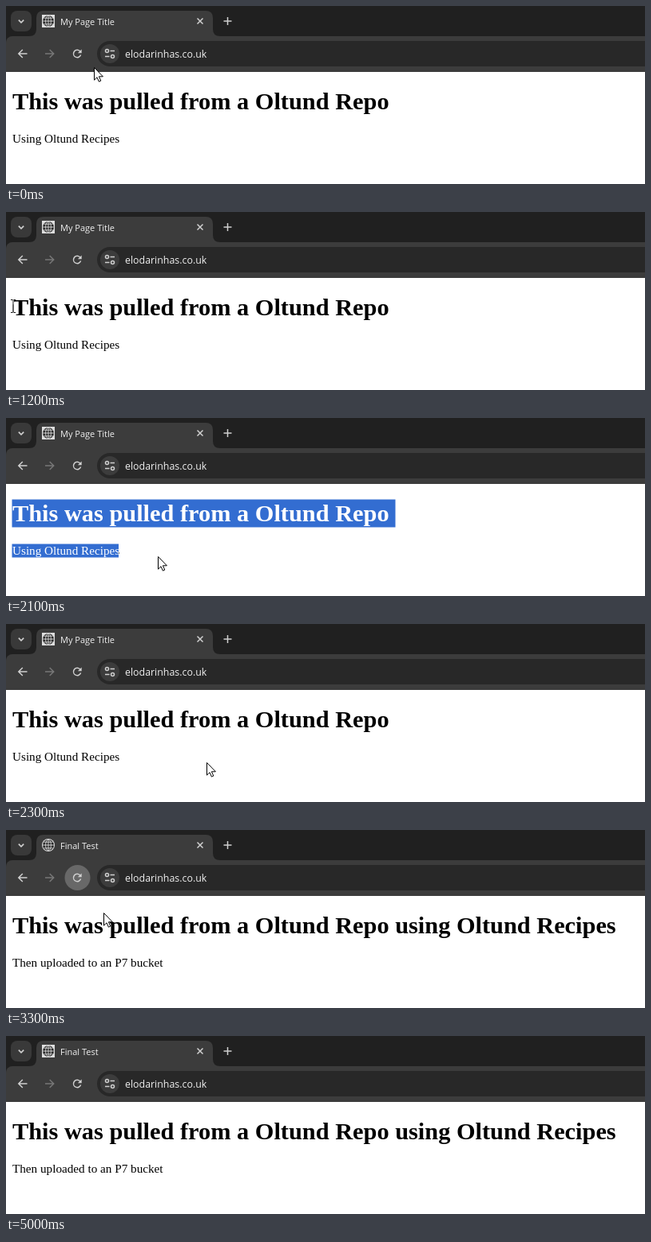
An HTML page with a canvas for the animation above (5200 ms loop, 800x224 px).

```html
<!DOCTYPE html>
<html lang="en">
<head>
<meta charset="utf-8">
<title>Browser reload</title>
<style>
  html, body { margin: 0; width: 100%; height: 100%; overflow: hidden; background: #fff; }
  canvas { display: block; }
</style>
</head>
<body>
<canvas id="stage" width="800" height="224"></canvas>
<script>
const ctx = document.getElementById('stage').getContext('2d');
const LOOP = 5200, STEP = 100;
const UI = '"Open Sans", "Noto Sans", sans-serif';
const SERIF = '"Liberation Serif", "Noto Serif", serif';
const BLUE = '#336dd1', BAR = '#3c3c3c', ICON = '#d0d0d0';

const oldPage = {
  tab: 'My Page Title',
  head: 'This was pulled from a Oltund Repo',
  para: 'Using Oltund Recipes'
};
const newPage = {
  tab: 'Final Test',
  head: 'This was pulled from a Oltund Repo using Oltund Recipes',
  para: 'Then uploaded to an P7 bucket'
};

// Pointer path: time, x, y
const path = [
  [0, 110, 77], [300, 86, 96], [600, 37, 119], [700, 33, 122],
  [900, 20, 126], [1200, 9, 118], [1300, 121, 160], [1500, 142, 165],
  [1800, 166, 167], [2100, 190, 174], [2400, 281, 174], [2500, 250, 150],
  [2700, 170, 113], [2900, 90, 62], [3000, 83, 52], [3200, 86, 60],
  [3300, 122, 104], [3600, 150, 124], [3800, 330, 142], [4000, 615, 150]
];
const beamTimes = [[400, 1400], [2600, 2700], [3400, 3600]];
const within = (t, a, b) => t >= a && t <= b;

function pointerAt(t) {
  const i = path.findIndex(p => p[0] >= t);
  if (i < 0) return null;
  const b = path[i], a = path[Math.max(0, i - 1)];
  const k = b === a ? 0 : (t - a[0]) / (b[0] - a[0]);
  return [Math.round(a[1] + (b[1] - a[1]) * k), Math.round(a[2] + (b[2] - a[2]) * k)];
}

function box(x, y, w, h, fill, r = 0) {
  ctx.fillStyle = fill;
  ctx.beginPath();
  ctx.roundRect(x, y, w, h, r);
  ctx.fill();
}

function disc(x, y, r, fill) {
  ctx.fillStyle = fill;
  ctx.beginPath();
  ctx.arc(x, y, r, 0, Math.PI * 2);
  ctx.fill();
}

function stroke(d, color, width) {
  ctx.strokeStyle = color;
  ctx.lineWidth = width;
  ctx.stroke(new Path2D(d));
}

function text(s, x, y, font, fill) {
  ctx.font = font;
  ctx.fillStyle = fill;
  ctx.fillText(s, x, y);
}

function globe(square) {
  if (square) box(45, 11, 16, 16, '#dedede');
  else disc(53, 19, 8, '#dedede');
  disc(53, 19, 7, '#2a2a2a');
  ctx.strokeStyle = '#d8d8d8';
  ctx.lineWidth = 0.9;
  ctx.beginPath();
  ctx.ellipse(53, 19, 3.4, 7, 0, 0, Math.PI * 2);
  ctx.stroke();
  stroke('M53 12V26M46 19H60M47.5 15.2H58.5M47.5 22.8H58.5', '#d8d8d8', 0.9);
}

function reload(t) {
  if (within(t, 2900, 3000)) disc(89.5, 60, 16, '#535353');
  else if (within(t, 3100, 3400)) disc(89.5, 60, 16, '#686868');
  ctx.strokeStyle = ICON;
  ctx.lineWidth = 1.5;
  ctx.beginPath();
  ctx.arc(89.2, 60, 4.7, 0.35, Math.PI * 1.78);
  ctx.stroke();
  ctx.fillStyle = ICON;
  ctx.fill(new Path2D('M94.7 54.4V59.2H89.9Z'));
}

function chrome(t, page) {
  box(0, 0, 800, 46, '#202020');
  box(6, 6, 26, 26, '#393939', 8);
  stroke('M15.8 17.6L19 20.8L22.2 17.6', ICON, 1.6);

  ctx.fillStyle = BAR;
  ctx.fill(new Path2D('M29 38Q38 38 38 29V15Q38 6 47 6H250Q259 6 259 15V29Q259 38 268 38Z'));
  globe(t !== 3300);
  text(page.tab, 68, 23.5, '500 11px ' + UI, '#f0f0f0');
  stroke('M239.5 15.5L246.5 22.5M246.5 15.5L239.5 22.5', ICON, 1.5);
  stroke('M272.5 19H282.5M277.5 14V24', ICON, 1.5);

  box(0, 38, 800, 45, BAR, [8, 0, 0, 0]);
  stroke('M26.5 60H16M20.8 55L15.8 60L20.8 65', ICON, 1.5);
  stroke('M49 60H59.5M54.7 55L59.7 60L54.7 65', '#777', 1.5);
  reload(t);

  box(114, 44, 720, 32, '#282828', 16);
  disc(130, 60, 12, BAR);
  stroke('M130.5 56.5H136M124 63.5H129.5', ICON, 1.5);
  for (const [x, y] of [[126.5, 56.5], [133.5, 63.5]]) {
    ctx.beginPath();
    ctx.arc(x, y, 2, 0, Math.PI * 2);
    ctx.stroke();
  }
  text('elodarinhas.co.uk', 149, 64.5, '500 12.4px ' + UI, '#f0f0f0');
}

function body(page, color) {
  text(page.head, 8, 130, 'bold 30.35px ' + SERIF, color);
  text(page.para, 8, 172, '15.2px ' + SERIF, color);
}

function selection(page, right) {
  ctx.save();
  ctx.beginPath();
  ctx.rect(7.5, 102.5, 480, 35);
  ctx.rect(7.5, 158.5, right - 7.5, 17);
  ctx.fillStyle = BLUE;
  ctx.fill();
  ctx.clip();
  body(page, '#fff');
  ctx.restore();
}

function pointer(t) {
  const pos = pointerAt(t);
  if (!pos) return;
  ctx.save();
  ctx.translate(pos[0], pos[1]);
  if (beamTimes.some(([a, b]) => within(t, a, b))) {
    ctx.globalCompositeOperation = 'difference';
    stroke('M-3 -7.5H-0.5M0.5 -7.5H3M0 -7V8M-3 8.5H-0.5M0.5 8.5H3', '#fff', 1.2);
  } else {
    const arrow = new Path2D('M0.5 0.5V16.2L4 12.8L6.4 18.2L8.8 17.1L6.4 11.8H11.4Z');
    ctx.fillStyle = '#fff';
    ctx.fill(arrow);
    ctx.strokeStyle = '#000';
    ctx.lineWidth = 1;
    ctx.stroke(arrow);
  }
  ctx.restore();
}

function draw(time) {
  const t = Math.floor((time % LOOP) / STEP) * STEP;
  const page = t < 3200 ? oldPage : newPage;
  box(0, 0, 800, 224, '#fff');
  chrome(t, page);
  body(page, '#000');
  if (within(t, 1300, 2200)) selection(page, t < 1400 ? 110 : 141);
  pointer(t);
}

let start;
function frame(now) {
  start ??= now;
  draw(now - start);
  requestAnimationFrame(frame);
}
requestAnimationFrame(frame);
</script>
</body>
</html>
```
